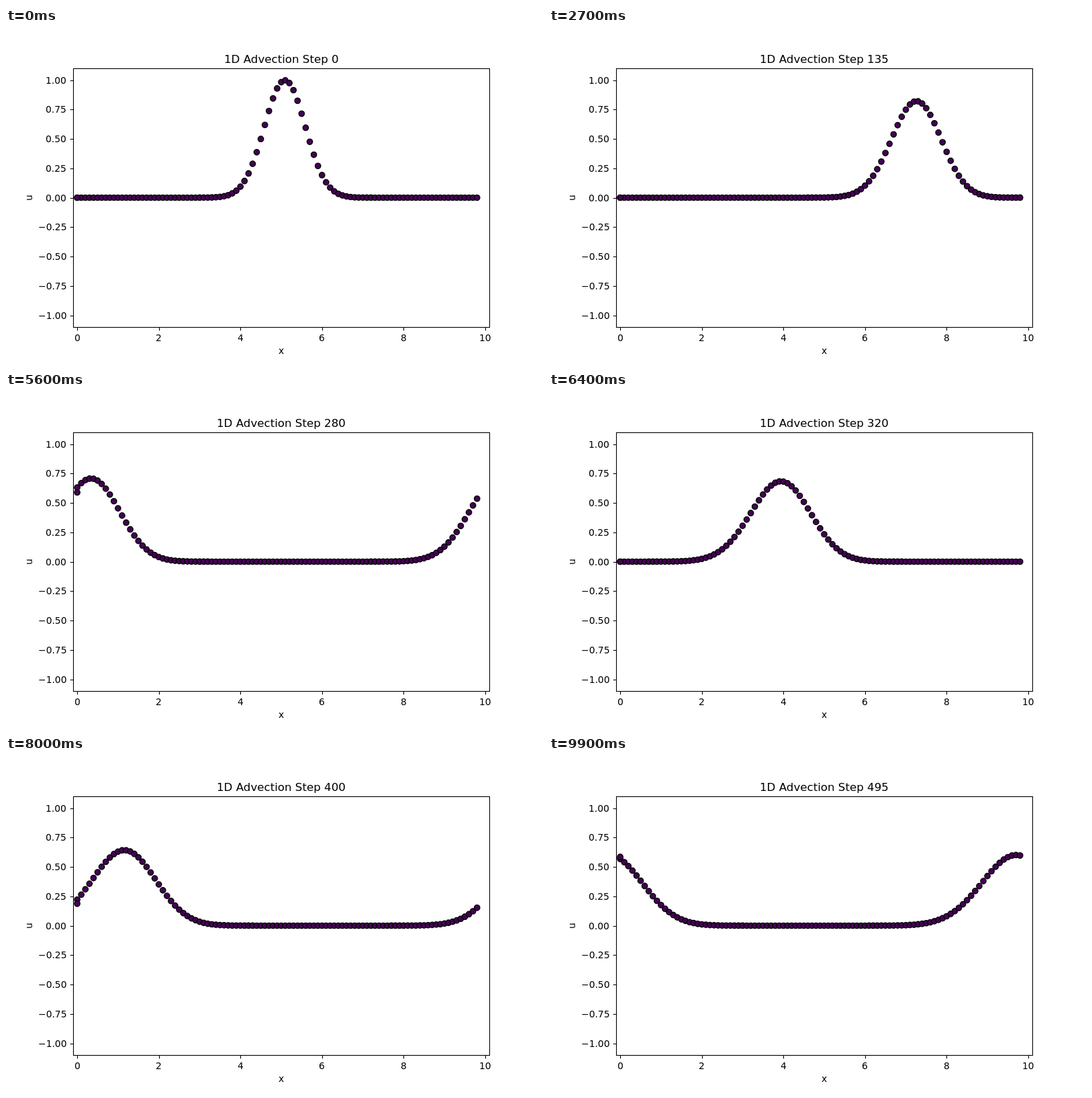
Recreate the animation shown at these times as an HTML page with a canvas. Size 800 by 500 pixels, loop 10 s.

```html
<!DOCTYPE html>
<html lang="en">
<head>
<meta charset="utf-8">
<title>1D Advection</title>
<style>
  html, body { margin: 0; width: 100%; height: 100%; overflow: hidden; background: #fff; }
  canvas { display: block; }
</style>
</head>
<body>
<canvas id="plot" width="800" height="500"></canvas>
<script>
const ctx = document.getElementById('plot').getContext('2d');
const PT = 100 / 72;
const FONT = '"DejaVu Sans", Verdana, sans-serif';
const BOX = { left: 100, right: 720, top: 60, bottom: 445 };
const COUNT = 100, FRAMES = 100, FRAME_MS = 100, STEPS = 5, CFL = 0.9;

const toX = x => BOX.left + (x + 0.1) * 620 / 10.2;
const toY = u => BOX.top + (1.1 - u) * 175;
const snap = v => Math.floor(v + 0.5) + 0.5;

// The last node sits at x = 0, next to the first one.
const nodes = Array.from({ length: COUNT }, (_, i) => i < COUNT - 1 ? i * 0.1 : 0);

// Upwind scheme; the first node takes over the last one's previous value.
function advance(u) {
  return u.map((v, i) => i ? v - CFL * (v - u[i - 1]) : u[COUNT - 1]);
}

function simulate() {
  const states = [];
  let u = advance(nodes.map(x => Math.exp(-2 * (x - 5) ** 2)));
  for (let k = 0; k < FRAMES; k++) {
    states.push(u);
    for (let s = 0; s < STEPS; s++) u = advance(u);
  }
  return states;
}

function label(text, x, y, align = 0.5, size = 10) {
  ctx.font = size * PT + 'px ' + FONT;
  ctx.fillStyle = '#000';
  ctx.fillText(text, Math.round(x - ctx.measureText(text).width * align), Math.round(y));
}

function line(x1, y1, x2, y2) {
  ctx.beginPath();
  ctx.moveTo(x1, y1);
  ctx.lineTo(x2, y2);
  ctx.stroke();
}

function drawAxes() {
  const tick = 3.5 * PT;
  const left = snap(BOX.left), bottom = snap(BOX.bottom);
  ctx.strokeStyle = '#000';
  ctx.lineWidth = 0.8 * PT;
  for (let x = 0; x <= 10; x += 2) {
    const px = toX(x);
    line(snap(px), bottom, snap(px), bottom + tick);
    label(String(x), px, 466);
  }
  for (let i = -4; i <= 4; i++) {
    const u = i / 4, py = toY(u);
    line(left - tick, snap(py), left, snap(py));
    label((u < 0 ? '\u2212' : '') + Math.abs(u).toFixed(2), BOX.left - 2 * tick, py + 5.07, 1);
  }
  ctx.strokeRect(left, snap(BOX.top), BOX.right - BOX.left, BOX.bottom - BOX.top);
  label('x', 410, 485);
  ctx.save();
  ctx.translate(39, 253);
  ctx.rotate(-Math.PI / 2);
  label('u', 0, 0);
  ctx.restore();
}

function drawDots(u) {
  ctx.fillStyle = '#440154';
  ctx.strokeStyle = '#000';
  ctx.lineWidth = PT;
  nodes.forEach((x, i) => {
    ctx.beginPath();
    ctx.arc(toX(x), toY(u[i]), 3 * PT, 0, 2 * Math.PI);
    ctx.fill();
    ctx.stroke();
  });
}

const states = simulate();

function render(now) {
  const k = Math.floor(now / FRAME_MS) % FRAMES;
  ctx.fillStyle = '#fff';
  ctx.fillRect(0, 0, 800, 500);
  drawDots(states[k]);
  drawAxes();
  label('1D Advection Step ' + k * STEPS, 410, 52, 0.5, 12);
}

function loop() {
  render(performance.now());
  requestAnimationFrame(loop);
}
loop();
</script>
</body>
</html>
```
